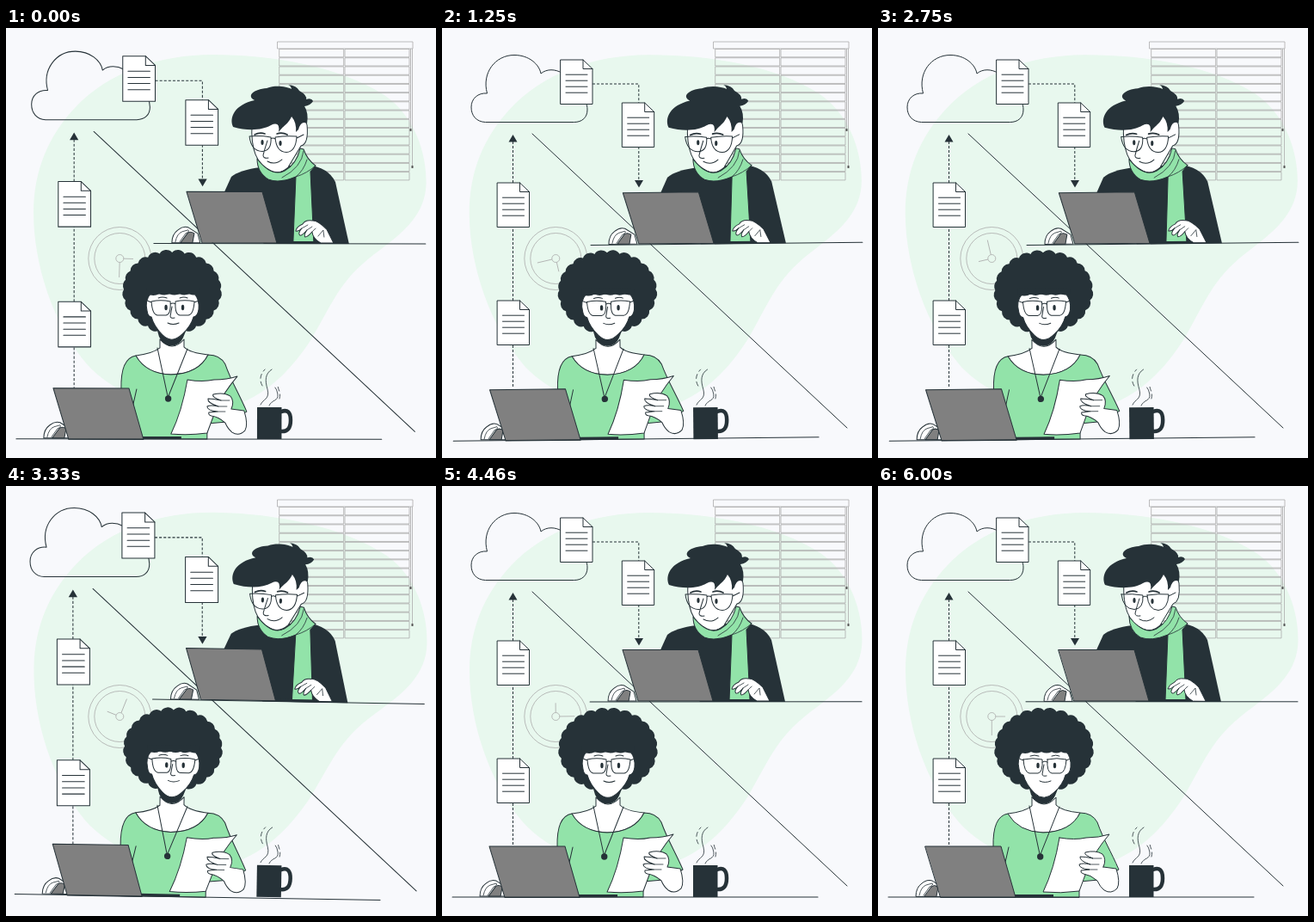
Animation, 500 px wide and 500 px high, one loop 6.04 s. Source, as an HTML page:

```html
<!DOCTYPE html>
<html lang="en">
<head>
<meta charset="utf-8">
<title>Sharing files through the cloud</title>
<style>
html, body { margin: 0; width: 100%; height: 100%; overflow: hidden; background: #f8f9fc; }
svg { display: block; width: 100vw; height: 100vh; }
.line { fill: none; stroke: #263238; stroke-width: 1; stroke-linecap: round; stroke-linejoin: round; }
.white { fill: #fff; }
.green { fill: #92e3a9; }
.gray { fill: #808080; }
.dark { fill: #263238; stroke: none; }
.pale { fill: none; stroke: #ababab; stroke-width: .8; }
.dash { stroke-dasharray: 3 2; stroke-linecap: butt; }
.thin { stroke-width: .8; }
.bold { stroke-width: 1.7; }
</style>
</head>
<body>
<svg viewBox="0 0 500 500">
  <defs>
    <g id="doc" class="line">
      <path class="white" d="M0 0H26L37 10.500V51.500H0Z"/>
      <path d="M26 0V10.500H37M6 17.200H31M6 24.200H31M6 31.200H31M6 38.200H31"/>
    </g>
    <g id="typing" class="line">
      <path class="white" d="M0 19Q0 9 7 4Q13 -1 19 1L30 8L33 19Z"/>
      <path class="gray" d="M10 19L18 8Q21 5 26 8L24 19Z"/>
      <path class="thin" d="M4 18Q6 8 12 6L19 4Q21 6 16 8L9 18"/>
    </g>
    <path id="laptop" class="line gray" d="M0 0H88L105 59.500H18Z"/>
  </defs>

  <path id="blob" fill="#e8f8ee" d="M32 215C32 165 50 125 80 93C120 50 180 31 240 31C310 31 390 45 440 78C475 102 489 145 488.500 180C488 215 464 236 436 257C390 290 384 312 355 362C332 397 302 430 255 442C200 455 130 430 95 392C55 345 32 275 32 215Z"/>

  <g class="pale">
    <path id="slats"/>
    <path d="M315.500 16H473V24H315.500ZM470.500 24V118M472.500 24V161"/>
    <path stroke="#555" stroke-width="2" d="M470.500 117V120M472.500 160V163"/>
  </g>

  <g class="pale">
    <circle cx="132.300" cy="268" r="36.500"/>
    <circle cx="132.300" cy="268" r="29.500"/>
    <circle cx="132.300" cy="268" r="4.500"/>
    <path id="hands" d="M132.300 272.500V290M136.800 268H148"/>
  </g>

  <g id="cloud" class="line">
    <path d="M50 109.500C40 109 34 102 34 92C34 82 42 75 52.500 76C46 52 62 31.500 84 31.500C101 31.500 113 42 115 53C122 47 132 48 139 52C152 56 158 68 158 79C166 80 169 88 169 95C169 104 163 109.500 154 109.500Z"/>
    <path d="M105 123L471 465"/>
    <path class="dash" d="M175 65H228.800V87M228.800 138V178M82.500 417V368M82.500 317V231M82.500 180V131"/>
    <path class="dark" d="M224 177H234L229 185.500ZM77.500 132.500H87.500L82.500 124Z"/>
    <use href="#doc" x="138" y="37"/>
    <use href="#doc" x="209.700" y="87"/>
    <use href="#doc" x="64.500" y="180"/>
    <use href="#doc" x="64.500" y="317"/>
  </g>

  <g id="man" class="line">
    <path class="dark" d="M252 195L262 173Q272 165 296 162L350 159Q375 162 383 179L399 251H300Z"/>
    <path class="white" d="M286 112C285 128 287 139 290 147Q295 160 308 166Q318 171 328 162L343 137Q352 135 350 113Q349 107 344 109L330 98Q305 96 286 112Z"/>
    <path class="green" d="M292 152Q292 168 305 176Q318 181 337 173L334 249H358L354 167L360 160Q350 153 346 141L342 140Q338 158 324 166Q309 174 292 152Z"/>
    <path class="thin" d="M346 143Q344 162 321 174M350 153Q346 166 337 173Q350 169 360 160"/>
    <path class="dark" d="M264 115C259 104 266 89 289 84C279 79 288 71 303 70C313 66 326 68 332 71Q331 67 328 66Q338 67 341 73Q350 78 349 83Q355 81 357 85Q354 90 347 91Q352 99 350 111Q343 107 340 118L337 121Q338 110 332 103C327 113 325 111 317 121Q319 108 308 113C298 119 281 120 264 115Z"/>
    <path d="M283 126Q296 125 308 127Q309 143 298 143.500Q285 143 283 126ZM313 127Q326 125 338 126Q337 144 326 144.500Q314 144 313 127ZM308 129Q310 127 313 129M338 128L346 124M304 131Q301 140 299 148Q299 152 305 151M304 155Q313 160 321 153"/>
    <path class="bold" d="M289 124Q295 121 301 123M315 123Q321 121 327 124"/>
    <ellipse class="dark" cx="298" cy="133" rx="1.600" ry="3"/>
    <ellipse class="dark" cx="319" cy="134" rx="1.600" ry="3"/>
    <use href="#typing" x="193" y="231"/>
    <path class="dark" d="M316 248H364V251H316Z"/>
    <use href="#laptop" x="210" y="190.500"/>
    <path class="white" d="M381 250L373 234Q362 223 356 224Q348 223 345 228Q338 231 337 236Q340 237 344 233Q339 239 342 241Q344 242 350 235Q346 241 348 243Q351 243 356 237Q357 245 366 250Z"/>
    <path class="thin" d="M344 233L351 229M350 235L356 231M356 237L360 233M363 242L369 235L370 243"/>
    <path d="M172 250.800H488"/>
  </g>

  <g id="woman" class="line">
    <path id="hair" class="dark"/>
    <path class="dark" d="M174 345H212L206 360Q202 369.500 192 369.500Q182 369 178 359Z"/>
    <path class="white" d="M179 362V372Q170 379 151 381Q160 402 192 403Q225 402 235 380Q214 378 207 371V362Q193 378 179 362Z"/>
    <path class="green" d="M133 478C136 455 134 440 134 420Q133 384 151 381Q163 402 192 403Q224 402 235 380Q249 380 255 391C262 411 271 425 280 446L257 458L234 460V478Z"/>
    <path d="M152 420L147 442M176 372L188 428M211 373L189 428"/>
    <circle class="dark" cx="188.700" cy="431" r="3.700"/>
    <path class="white" d="M168 309Q161 317 164 329Q165 336 169 336Q172 347 182 357Q193 368 205 356Q215 347 218 336Q223 335 224 327Q225 316 219 309Z"/>
    <path class="dark" d="M163 302H224V309Q218 312 213 309Q207 312 202 309Q196 312 190 309Q184 312 178 309Q172 313 163 309Z"/>
    <path d="M169 318Q180 315.500 191 318Q192 333 186 334H176Q170 333 169 318ZM197 318Q208 315.500 219 318Q218 333 212 334H202Q196 333 197 318ZM191 321Q194 319 197 321M169 319L164 317M219 319L224 317M193 324L191 335Q191 338 196 337M188 343Q194 346 201 343M177 314Q182 312 187 314M202 314Q207 312 211 314"/>
    <ellipse class="dark" cx="186" cy="325" rx="1.700" ry="3.200"/>
    <ellipse class="dark" cx="205.500" cy="325" rx="1.700" ry="3.200"/>
    <use href="#typing" x="44" y="458"/>
    <path class="dark" d="M157 475H204V478H157Z"/>
    <use href="#laptop" x="55" y="419"/>
    <path class="white" d="M211 409Q229 412 242 409Q257 409 269 405Q252 425 244 444L234 471Q212 474 192 472Q205 445 211 409Z"/>
    <path class="white" d="M262 443L277 445Q282 461 278 468Q271 475 263 470Q258 466 255 459Q247 452 239 451Q235 450 236 447L246 446Q234 445 234 440Q238 438 247 440Q234 436 235 431Q241 431 250 433Q239 429 241 426Q253 423 261 428Q266 434 262 443Z"/>
    <path class="thin" d="M247 440L257 440M250 433L260 433M246 446L255 446"/>
    <path d="M12 478H437"/>
  </g>

  <g id="mug" class="line">
    <path class="dark" d="M292 441H320.500V478H292Z"/>
    <path d="M320 446Q331 442 331 456Q331 470 320 469" style="stroke-width:4.500"/>
    <path class="thin" d="M296 438C299 431 307 432 304 420C301 410 301 402 309 397M306 439C309 432 317 434 316 426Q315 420 313 418"/>
    <path class="thin" style="stroke-dasharray:5 4" d="M298 416C294 409 296 402 301 397M318 431C320 423 316 421 316 415"/>
  </g>
</svg>
<script>
const LOOP = 6040, CYCLE = 1500, FPS = 24, LEAD = 30;
const el = id => document.getElementById(id);

let slats = '';
for (let i = 0; i < 15; i++) {
  const y = 24.5 + i * 10.22;
  for (const x of [317.7, 394]) slats += `M${x} ${y}h75v9.3h-75z`;
}
el('slats').setAttribute('d', slats);

// Curly hair: small arcs around an oval that is fuller below
let curls = '';
const bumps = 24;
for (let i = 0; i <= bumps; i++) {
  const a = i / bumps * 2 * Math.PI, sin = Math.sin(a);
  const p = `${193 + 56 * Math.cos(a)} ${304 + (sin > 0 ? 49 : 43) * sin}`;
  curls += i ? `A9 9 0 0 1 ${p}` : `M${p}`;
}
el('hair').setAttribute('d', curls + 'Z');

const sway = [[0, 0], [375, 1], [1125, -1], [1500, 0]];
const beat = [[0, 1], [150, 1.1], [445, 1], [600, 1], [750, 1.1], [900, 1], [1500, 1]];

function track(keys, t) {
  const i = keys.findIndex(k => k[0] > t);
  const [t0, a] = keys[i - 1], [t1, b] = keys[i];
  return a + (b - a) * (t - t0) / (t1 - t0);
}

const rotate = (id, angle, x, y) =>
  el(id).setAttribute('transform', `rotate(${angle} ${x} ${y})`);

function draw(ms) {
  const step = Math.floor((ms % LOOP + 4.99) * FPS / 1000);
  const t = Math.min(step * 1000 / FPS + LEAD, 6000);
  const phase = t % CYCLE;
  const tilt = track(sway, phase);
  rotate('blob', tilt, 260, 240);
  rotate('man', tilt, 330, 158.5);
  rotate('woman', tilt, 224.5, 368);
  rotate('mug', tilt, 312, 437);
  rotate('hands', t * .06, 132.3, 268);
  el('cloud').setAttribute('transform',
    `translate(250 250) scale(${track(beat, phase)}) translate(-250 -250)`);
}

const start = performance.now();
function tick() {
  draw(performance.now() - start);
  requestAnimationFrame(tick);
}
tick();
</script>
</body>
</html>
```
